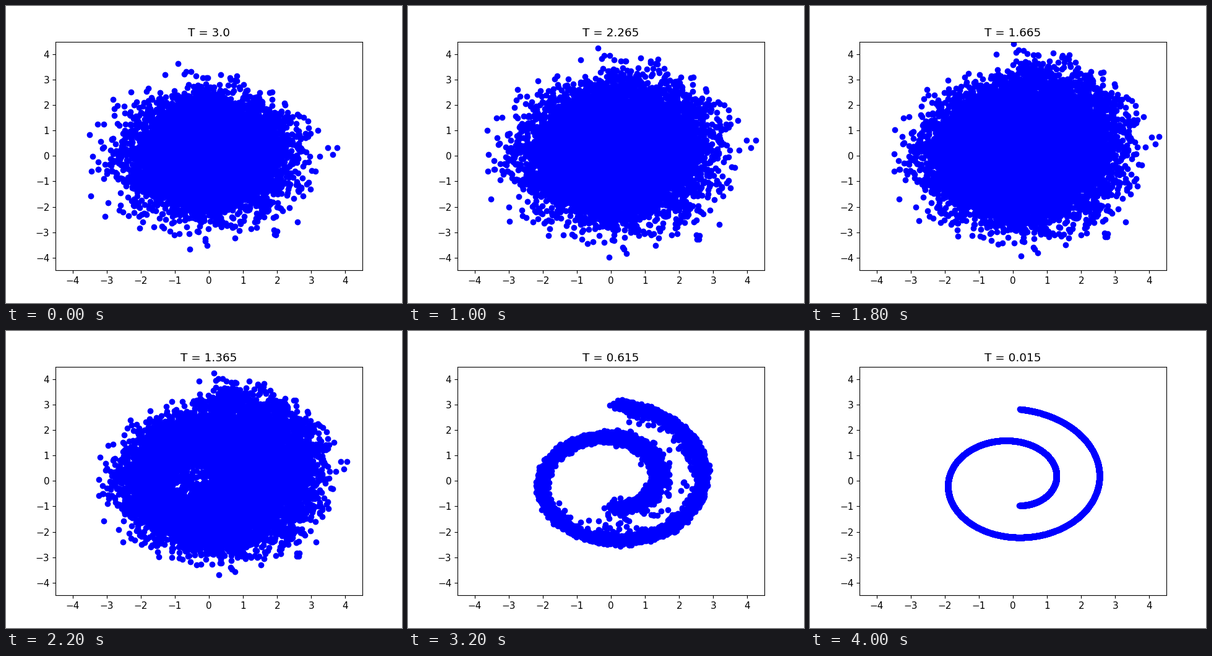
A matplotlib script that plays this animation: 640x480 px, repeating every 4.1 s.

```python
import numpy as np
import matplotlib.pyplot as plt
from matplotlib.animation import FuncAnimation

FRAMES = 41
INTERVAL = 100
T_START = 3.0
T_FRAME = 0.075   # diffusion time per frame
T_STEP = 0.015    # one sampler step, shown as lag in the title
SUBSTEPS = 3
COUNT = 10000
MAX_RADIUS = 3.9


def spiral(n=300):
    """Swiss roll in the plane, sampled evenly along its length."""
    a = np.sqrt(np.linspace((1.5 * np.pi) ** 2, (4.5 * np.pi) ** 2, n))
    return (0.2 * np.column_stack([a * np.cos(a), a * np.sin(a)])).astype(np.float32)


ROLL = spiral()
ROLL_HALF_SQ = (ROLL ** 2).sum(axis=1) / 2
ROLL_ONE = np.column_stack([ROLL, np.ones(len(ROLL), np.float32)])


def start_cloud():
    rng = np.random.default_rng(7)
    pts = rng.standard_normal((COUNT + 100, 2))
    pts = pts[np.hypot(pts[:, 0], pts[:, 1]) < MAX_RADIUS]
    return pts[:COUNT].astype(np.float32)


def denoised(p, width):
    """Expected clean point: Gaussian-weighted mean of the spiral."""
    w = p @ ROLL.T
    w -= ROLL_HALF_SQ
    w *= np.float32(1 / width ** 2)
    w -= w.max(axis=1, keepdims=True)
    np.exp(w, out=w)
    s = w @ ROLL_ONE
    return s[:, :2] / s[:, 2:]


def spread(p):
    """Early drift that widens and shifts the cloud, weaker far out."""
    x, y = p.T
    gain = 0.35 / (1 + (x ** 2 + y ** 2) / 9)
    return np.column_stack([0.2 + gain * x + 0.035 * y ** 2,
                            0.2 + 0.03 * x + (gain + 0.05) * y])


def simulate():
    p = start_cloud()
    path = [p]
    dt = T_FRAME / SUBSTEPS
    for i in range((FRAMES - 1) * SUBSTEPS):
        t = T_START - (i + 0.5) * dt
        fade = np.clip((t - 1.2) / 1.2, 0, 1)
        pull = 1 - np.exp(-20.3 * np.exp(-2.2 * t) * dt)
        width = min(0.07 + 0.32 * t, 0.5)
        scale = np.float32(1 + 0.12 * t)
        goal = scale * denoised(p / scale, width)
        p = (p + pull * (goal - p) + fade * dt * spread(p)).astype(np.float32)
        if (i + 1) % SUBSTEPS == 0:
            path.append(p)
    return path


PATH = simulate()

plt.rcParams["font.size"] = 11
fig, ax = plt.subplots(figsize=(6.4, 4.8), dpi=100)
ax.set_xlim(-4.5, 4.5)
ax.set_ylim(-4.5, 4.5)
ax.set_xticks(range(-4, 5))
ax.set_yticks(range(-4, 5))
dots, = ax.plot([], [], "bo")
title = ax.set_title("T = 3.0")


def draw(k):
    dots.set_data(PATH[k][:, 0], PATH[k][:, 1])
    t = T_START - k * T_FRAME + (T_STEP if k else 0)
    title.set_text(f"T = {round(t, 3)}")
    return dots, title


anim = FuncAnimation(fig, draw, frames=FRAMES, init_func=lambda: draw(0),
                     interval=INTERVAL, repeat=True, repeat_delay=0, blit=False)
plt.show()
```
